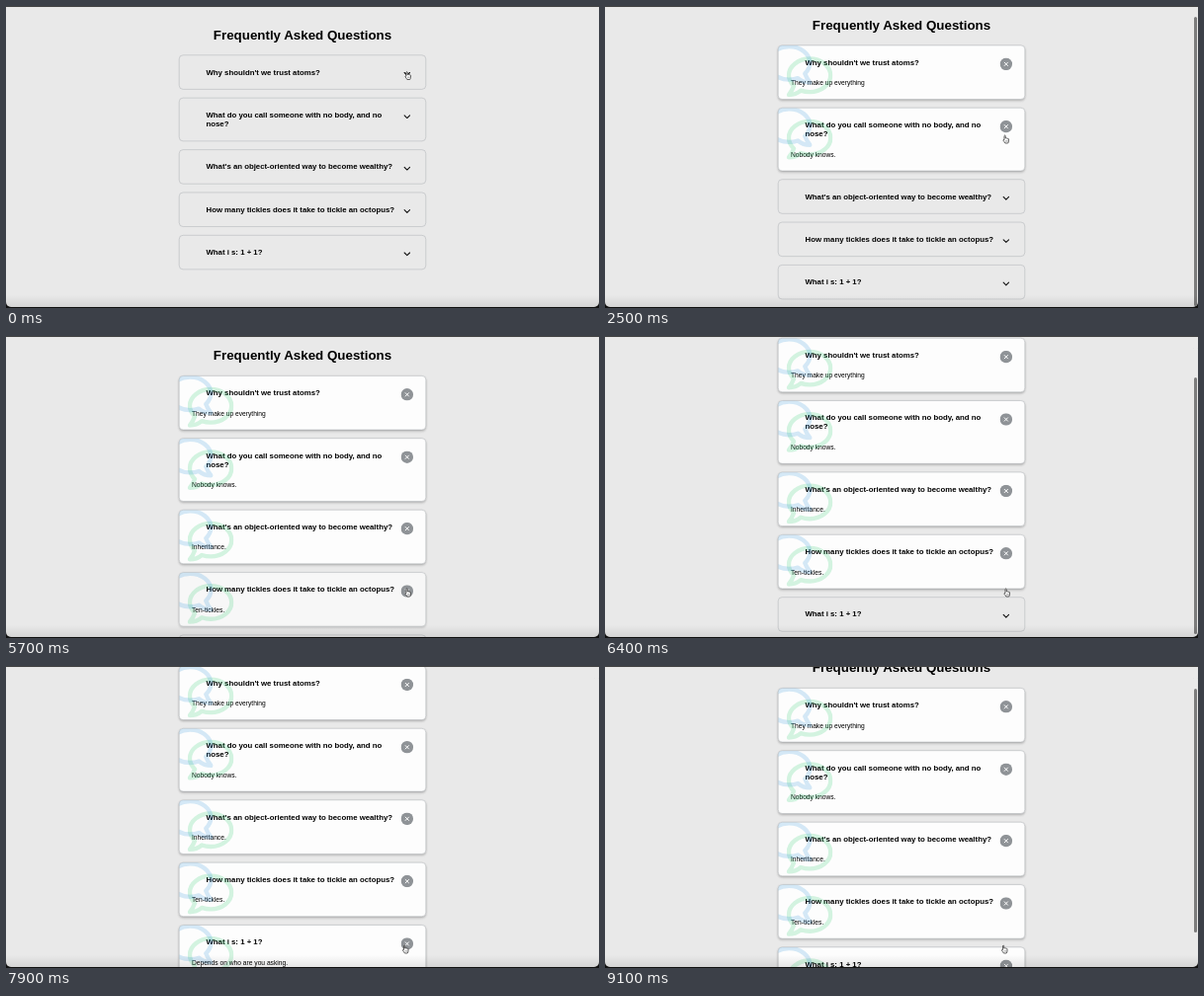
An HTML page that plays this animation: 600 px wide and 306 px high, repeating every 9200 ms.

```html
<!DOCTYPE html>
<html lang="en">
<head>
<meta charset="utf-8">
<title>Frequently Asked Questions</title>
<style>
html, body { margin: 0; width: 100%; height: 100%; overflow: hidden; background: #111; }
#stage { position: relative; width: 600px; height: 306px; overflow: hidden; }
#view { position: absolute; inset: 0 0 1px; overflow: hidden; background: #e9e9e9; border-radius: 0 0 5px 5px; }
#view::after {
  content: ""; position: absolute; inset: auto 0 0; height: 12px;
  background: linear-gradient(transparent, rgba(0,0,0,.09));
}
#bar { position: absolute; inset: 0 0 auto; height: 1px; background: #444; }
/* laid out on a 1440px wide page, shown at 600px */
#page {
  position: absolute; left: 0; top: 0; width: 1440px; padding-top: 1.5px;
  transform-origin: 0 0; font: 16px/18px "Liberation Sans", Arial, sans-serif; color: #000;
}
h1 { margin: 50px 0 30px; font-size: 32px; line-height: 37px; text-align: center; }
.card {
  position: relative; box-sizing: border-box; width: 600px; margin: 0 auto 20px; padding: 30px;
  border: 1px solid #9fa4a8; border-radius: 10px; overflow: hidden;
}
h3 { margin: 0 35px; font-size: 18.72px; line-height: 22px; white-space: nowrap; }
p { margin: 30px 0 0; }
.bubble { position: absolute; width: 112px; height: 112px; opacity: .2; fill: none; stroke-width: 48; stroke-linejoin: round; }
.green { left: 20px; top: 20px; stroke: #2ecc71; }
.blue { left: -30px; top: -10px; stroke: #3498db; transform: scaleX(-1); }
.toggle { position: absolute; top: 30px; right: 30px; width: 30px; height: 30px; fill: none; stroke-linecap: round; stroke-linejoin: round; }
.card:not(.open) :is(p, .bubble, .close), .open .chevron { display: none; }
#thumb { position: absolute; left: 596px; width: 3px; border-radius: 2px; background: #7c7c7c; }
#hand { position: absolute; left: 0; top: 0; width: 8px; height: 10px; overflow: visible; }
</style>
</head>
<body>
<div id="stage">
  <div id="view">
    <div id="page"><h1>Frequently Asked Questions</h1></div>
    <div id="thumb"></div>
  </div>
  <div id="bar"></div>
  <svg id="hand" viewBox="0 0 8 10">
    <path d="M2 5.6V1.5q.6-1 1.2 0V4q.6-.5 1.1.1.6-.4 1.1.2.8-.3 1.1.5v2Q6.400 8 5.700 9H2.900Q2.200 7.700 1 6.300q-.2-1.100 1-.7Z"
      fill="#fff" stroke="#222" stroke-width=".7" stroke-linejoin="round"/>
    <path d="M3.500 6v1.700M4.500 6v1.700M5.400 6v1.700" stroke="#555" stroke-width=".35"/>
  </svg>
</div>
<script>
const LOOP = 9200, STEP = 100, SCALE = 600 / 1440, FADE = 300;
const $ = id => document.getElementById(id);

// question, answer, opening time
const faqs = [
  ["Why shouldn't we trust atoms?", "They make up everything", 200],
  ["What do you call someone with no body, and no<br>nose?", "Nobody knows.", 1900],
  ["What's an object-oriented way to become wealthy?", "Inheritance.", 4010],
  ["How many tickles does it take to tickle an octopus?", "Ten-tickles.", 5500],
  ["What i s: 1 + 1?", "Depends on who are you asking.", 7500]
];

const bubble = side => `<svg class="bubble ${side}" viewBox="0 0 512 512"><path d="M158 408Q205 424 256 424
  C384 424 488 342 488 240S384 56 256 56 24 138 24 240Q24 300 80 358Q64 405 24 456Q100 456 158 408Z"/></svg>`;
const toggle = `<svg class="toggle" viewBox="0 0 30 30">
  <path class="chevron" d="M8.500 12l6.500 6.500 6.500-6.500" stroke="#111" stroke-width="2.600"/>
  <g class="close"><circle cx="15" cy="15" r="15" fill="#8f9397"/>
  <path d="M11 11l8 8m0-8l-8 8" stroke="#fff" stroke-width="2.400"/></g></svg>`;

const cards = faqs.map(([question, answer, start]) => {
  const el = document.createElement("div");
  el.className = "card";
  el.innerHTML = `<h3>${question}</h3><p>${answer}</p>${bubble("green")}${bubble("blue")}${toggle}`;
  $("page").append(el);
  return { el, start };
});

const linear = u => u;
const smooth = u => u * u * (3 - 2 * u);

// value at time t along [time, value] keys
function track(keys, t, ease = linear) {
  const i = keys.findIndex(k => k[0] > t);
  if (i === 0) return keys[0][1];
  if (i < 0) return keys[keys.length - 1][1];
  const [t0, a] = keys[i - 1], [t1, b] = keys[i];
  return a + (b - a) * ease((t - t0) / (t1 - t0));
}

const scrollKeys = [[2300, 0], [2500, 9.9], [2700, 9.4], [5900, 9.4], [6400, 47.6], [6600, 49.8],
  [7900, 49.8], [8300, 70], [8500, 70], [8600, 68.7], [9100, 27.4]];
const thumbKeys = [[2300, 0], [2400, 1], [2900, 1], [3200, 0], [5800, 0], [5900, 1],
  [6900, 1], [7200, 0], [7900, 0], [8000, 1]];
const handX = [[800, 407], [1600, 406], [2600, 406], [3300, 405.5], [4300, 405.5], [5300, 407], [6500, 407], [7300, 404.5]];
const handY = [[800, 70.5], [1600, 135], [2600, 135], [3300, 196.5], [4300, 196.5], [5300, 260], [6500, 260], [7300, 287]];

function draw(t) {
  let opened = 0;
  for (const { el, start } of cards) {
    const open = t >= start;
    const k = open ? smooth(Math.min(1, (t - start) / FADE)) : 0;
    const shadow = `0 3px 6px rgba(0,0,0,${.13 * k})`;
    el.classList.toggle("open", open);
    el.style.backgroundColor = `rgba(253,253,253,${k})`;
    el.style.boxShadow = `${shadow}, ${shadow}`;
    opened += open;
  }

  const scroll = track(scrollKeys, t);
  $("page").style.transform = `scale(${SCALE}) translateY(${-scroll / SCALE}px)`;

  const pageHeight = (659 + 48 * opened) * SCALE, ratio = 304 / pageHeight;
  Object.assign($("thumb").style, {
    top: 1 + scroll * ratio + "px",
    height: Math.min(303, 304 * ratio) + "px",
    opacity: track(thumbKeys, t)
  });
  $("hand").style.transform = `translate(${track(handX, t, smooth) - 4}px, ${track(handY, t, smooth) - 5}px)`;
}

const begin = performance.now();
function tick() {
  const t = (performance.now() - begin) % LOOP;
  draw(Math.floor(t / STEP) * STEP);
  requestAnimationFrame(tick);
}
tick();
</script>
</body>
</html>
```
